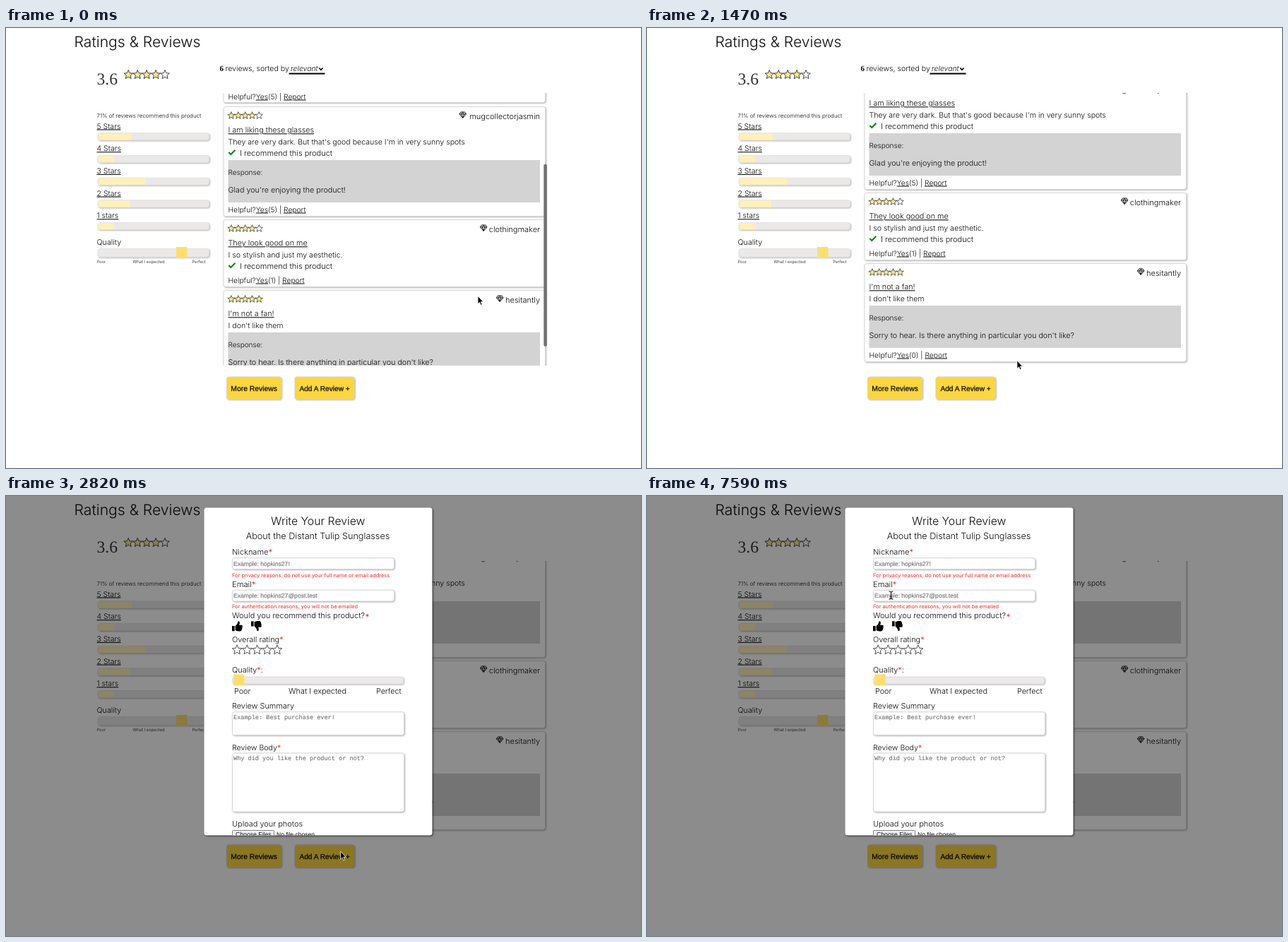
An HTML page that plays this animation: 899x623 px, repeating every 8 s.

```html
<!DOCTYPE html>
<html lang="en">
<head>
<meta charset="utf-8">
<title>Ratings &amp; Reviews</title>
<style>
html, body { margin: 0; width: 100%; height: 100%; overflow: hidden; background: #fff; }
svg { display: block; width: 899px; height: 623px; }
text { font: 300 10.8px Inter, sans-serif; fill: #0c0c0c; text-rendering: geometricPrecision; white-space: pre; }
.u { text-decoration: underline; text-decoration-thickness: .9px; text-underline-offset: 1.2px; }
.req { fill: #f00; }
.note { fill: #f52a2a; font-weight: 400; }
.sans { font-family: "Liberation Sans", Arial, sans-serif; font-weight: 400; }
.btn { stroke: #0c0c0c; stroke-width: .25px; }
.hint { fill: #757575; stroke: #757575; stroke-width: .15px; }
.mono { font-family: "Liberation Mono", monospace; font-weight: 400; }
.serif { font-family: "Liberation Serif", serif; font-weight: 400; }
.lift { filter: drop-shadow(1.5px 1.5px .8px rgba(0, 0, 0, .3)); }
.end { text-anchor: end; }
.mid { text-anchor: middle; }
</style>
</head>
<body>
<svg id="stage" viewBox="0 0 899 623" xmlns="http://www.w3.org/2000/svg"></svg>
<script>
const stage = document.getElementById('stage');

const text = (x, y, s, size = 10.8, cls = '', css = '') =>
  `<text x="${x}" y="${y}" class="${cls}" style="font-size:${size}px;${css}">${s}</text>`;
const rect = (x, y, w, h, fill, extra = '') =>
  `<rect x="${x}" y="${y}" width="${w}" height="${h}" fill="${fill}" ${extra}/>`;
const box = (x, y, w, h, fill = '#fff', line = '#d0d0d0', r = 3) =>
  rect(x + .5, y + .5, w - 1, h - 1, fill, `rx="${r}" stroke="${line}" stroke-width=".8" class="lift"`);
const link = s => `<tspan class="u">${s}</tspan>`;
const star = '<tspan class="req">*</tspan>';

function starPath(cx, cy, r) {
  const pts = [];
  for (let i = 0; i < 10; i++) {
    const a = Math.PI * (i / 5 - .5), k = i % 2 ? r * .45 : r;
    pts.push((cx + k * Math.cos(a)).toFixed(2) + ',' + (cy + k * Math.sin(a)).toFixed(2));
  }
  return pts.join(' ');
}

function stars(x, cy, pitch, r, full, line = .7) {
  let s = '';
  for (let i = 0; i < 5; i++)
    s += `<polygon points="${starPath(x + pitch * (i + .5), cy, r)}" fill="${i < full ? '#fbe78f' : '#fff'}"
      stroke="#222" stroke-width="${line}" stroke-linejoin="round"/>`;
  return s;
}

const gem = (x, y) => `<path transform="translate(${x} ${y})" d="M2.4 .5H7.9L9.9 3.4 5.1 9 .4 3.4ZM.4 3.4H9.9M3.3 3.4 5.1 .6 7 3.4 5.1 8.8Z"
  fill="none" stroke="#111" stroke-width="1" stroke-linejoin="round"/>`;
const tick = y => `<path d="M315.3 ${y}l3 3 6.2-6.3" fill="none" stroke="#0a860a" stroke-width="2.1"/>`;

const helpful = (y, n) => text(314.5, y, `Helpful?${link('Yes')}(${n}) | ${link('Report')}`, 10.25);

// One review card; rows are stacked below its top edge.
function card(top, o) {
  let y = top + 54, s = '';
  if (o.recommend) {
    s += tick(y + 11) + text(331, y + 16, 'I recommend this product', 11);
    y += 16;
  }
  if (o.reply) {
    s += rect(314.5, y + 6, 441.5, 60, '#d3d3d3') + text(314.5, y + 26.5, 'Response:', 10) +
      text(314.5, y + 51.5, o.reply, 10.75);
    y += 60;
  }
  return box(307.5, top, 456.5, y + 26 - top) + s +
    stars(314, top + 13, 9.85, 5.3, o.full) +
    text(756, top + 18, o.name, 11, 'end') + gem(o.gem, top + 7.5) +
    text(314.5, top + 37.3, o.title, 10.75, 'u') + text(314.5, top + 53.6, o.body, 10.6) +
    helpful(y + 19.5, o.votes);
}

const cards =
  box(307.5, 20, 456.5, 86) + helpful(100.5, 5) +
  card(111, { name: 'mugcollectorjasmin', gem: 641.5, full: 4, title: 'I am liking these glasses',
    body: "They are very dark. But that's good because I'm in very sunny spots",
    recommend: true, reply: "Glad you're enjoying the product!", votes: 5 }) +
  card(271, { name: 'clothingmaker', gem: 671, full: 4, title: 'They look good on me',
    body: 'I so stylish and just my aesthetic.', recommend: true, votes: 1 }) +
  card(371, { name: 'hesitantly', gem: 694, full: 5, title: "I'm not a fan!", body: "I don't like them",
    reply: "Sorry to hear. Is there anything in particular you don't like?", votes: 0 });

function summary() {
  let s = text(96.5, 27, 'Ratings &amp; Reviews', 21.15) + text(128.5, 80, '3.6', 23.6, 'serif', 'fill:#333') +
    stars(166.8, 66.2, 12.95, 6.7, 4, .85) +
    text(128.5, 127.3, '71% of reviews recommend this product', 7.95);
  ['5 Stars', '4 Stars', '3 Stars', '2 Stars', '1 stars'].forEach((label, i) => {
    const y = 148.5 + 31.7 * i, w = [47, 22, 67, 45, 22][i];
    s += text(128.5, y - 6, label, 10.5, 'u') + box(129.5, y, 158.5, 10.8, '#ebe8e8', '#e2dfdf') +
      rect(131, y + .8, w, 9.2, '#fdf0b9');
  });
  return s + text(128.5, 307.3, 'Quality', 10.7) + box(129.5, 312.3, 158.5, 12.5, '#ebe8e8', '#e2dfdf') +
    rect(241, 310, 15.5, 15.5, '#fede6f') + text(128.5, 333.3, 'Poor', 5.8) +
    text(179.5, 333.3, 'What I expected', 6) + text(263.5, 333.3, 'Perfect', 5.8);
}

const heading =
  text(302.5, 60.5, '6', 11, 'serif', 'font-weight:700') + text(310.5, 60.5, 'reviews, sorted by', 10.6) +
  text(403, 60.5, 'relevant', 10.4, '', 'font-style:italic') +
  '<path d="M443.3 56.5l2.6 2.8 2.6-2.8" fill="none" stroke="#000" stroke-width="1.6"/>' +
  rect(400.5, 63.6, 51, 2, '#000');

const button = (x, w, label, size) =>
  box(x, 493.5, w, 32.6, '#fcd640', '#d8d3c0') + text(x + w / 2, 513.8, label, size, 'sans btn mid');
const buttons = button(312, 78.2, 'More Reviews', 10.35) + button(408.5, 85.2, 'Add A Review +', 10.15);

const thumb = (x, y, flip) => `<path transform="translate(${x} ${y}) scale(1 ${flip})"
  d="M0-.3H3.6V7H0ZM4.6-.2C6.5-1.8 8-3.4 8.2-6 8.4-7.6 10.8-7.3 10.9-4.8 10.9-3.4 10.3-2.4 10.1-1.5H13.4C15-1.5 15.2 .3 14.3 1.1 15 2 14.8 3.2 14 3.7 14.3 4.7 13.9 5.5 13.2 5.9 13.3 6.9 12.5 7.3 11.3 7.3H9C7 7.3 6 6.3 4.6 6.1Z" fill="#000"/>`;

const form =
  rect(280.5, 16.5, 323, 464, '#fff', 'rx="3.5" style="filter:drop-shadow(1.5px 1.5px 1.2px rgba(0,0,0,.7))"') +
  '<g clip-path="url(#sheet)">' +
  text(441.8, 41.2, 'Write Your Review', 15.8, 'mid') +
  text(441.5, 61, 'About the Distant Tulip Sunglasses', 12.65, 'mid') +
  text(320, 83.2, 'Nickname' + star, 11) + box(320, 87.3, 230, 16.7) +
  text(322, 98.6, 'Example: hopkins27!', 8.6, 'sans hint') +
  text(320, 114.6, 'For privacy reasons, do not use your full name or email address', 7.45, 'note') +
  text(320, 128.5, 'Email' + star, 11.2) + box(320, 132.8, 230, 16.7) +
  text(322, 144, 'Example: hopkins27@post.test', 8.6, 'sans hint') +
  text(320, 159.4, 'For authentication reasons, you will not be emailed', 7.45, 'note') +
  text(320, 173.4, 'Would you recommend this product?' + star, 11) +
  thumb(320, 184.2, 1) + thumb(347, 184.2, -1) +
  text(320, 207, 'Overall rating' + star, 10.9) + stars(320, 218, 14.2, 7.2, 0, .8) +
  text(320, 249.6, 'Quality' + star + ':', 10.9) + box(320, 255.7, 243, 10.8, '#ebe9e9', '#dedcdc') +
  rect(322, 252.6, 15.6, 15.6, '#fede6f') +
  text(323, 279.7, 'Poor', 10.8) + text(400, 279.7, 'What I expected', 10.9) + text(524, 279.7, 'Perfect', 10.7) +
  text(320, 301.2, 'Review Summary', 10.9) + box(320, 305.3, 244, 33.7) +
  text(322, 315.6, 'Example: Best purchase ever!', 8.57, 'mono hint') +
  text(320, 359.8, 'Review Body' + star, 10.6) + box(320, 363.6, 244, 84) +
  text(322, 374, 'Why did you like the product or not?', 8.57, 'mono hint') +
  text(320, 468.2, 'Upload your photos', 10.95) +
  rect(320.5, 473.5, 59, 13, '#efefef', 'rx="1" stroke="#777" stroke-width=".9"') +
  text(325, 482.2, 'Choose Files', 8.7, 'sans') + text(383, 482.2, 'No file chosen', 8.5, 'sans') +
  '</g>';

stage.innerHTML = `
  <defs>
    <clipPath id="list"><rect x="306" y="92" width="461" height="386"/></clipPath>
    <clipPath id="sheet"><rect x="280.5" y="16.5" width="323" height="464"/></clipPath>
  </defs>
  ${rect(0, 0, 899, 623, '#fff')}${summary()}${heading}
  <g clip-path="url(#list)"><g id="cards">${cards}</g></g>
  ${rect(761.3, 192.8, 4.6, 258, '#717171', 'rx="2" id="bar"')}
  ${buttons}
  <g id="modal">${rect(0, 0, 899, 623, '#000', 'fill-opacity=".45"')}${form}</g>
  <path id="arrow" d="M0 0V11.2L2.5 8.9 4.2 12.8 6.1 12 4.4 8.2H7.8Z" fill="#000" stroke="#fff" stroke-width=".8"/>
  <g id="beam" fill="none">
    <path d="M-3-5.5Q0-5.5 0-3.5Q0-5.5 3-5.5M0-4V4M-3 5.5Q0 5.5 0 3.5Q0 5.5 3 5.5M-1.5 1.5H1.5" stroke="#111" stroke-width="1.1"/>
  </g>`;

const [cardsEl, bar, modal, arrow, beam] =
  ['cards', 'bar', 'modal', 'arrow', 'beam'].map(id => document.getElementById(id));

const LOOP = 8000, TICK = 148.8;
const clamp = v => Math.max(0, Math.min(1, v));

// Pointer stops: tick, x, y
const route = [
  [6, 668, 379.5], [12, 473.5, 503], [20, 473.5, 503], [28, 381.5, 127],
  [29, 364.5, 115.5], [31, 361.5, 109.7], [32, 361.5, 109.7], [33, 361.5, 99], [35, 361.5, 99],
  [36, 361.5, 98.3], [38, 361.5, 98.3], [41, 357, 88], [44, 335.5, 113], [46, 345.5, 131], [51, 345.5, 140.5]
];

function pointer(n) {
  if (n <= route[0][0]) return route[0].slice(1);
  for (let i = 1; i < route.length; i++) {
    const [a, ax, ay] = route[i - 1], [b, bx, by] = route[i];
    if (n <= b) {
      const k = (n - a) / (b - a), e = k * k * (3 - 2 * k);
      return [ax + (bx - ax) * e, ay + (by - ay) * e];
    }
  }
  return route[route.length - 1].slice(1);
}

function draw(ms) {
  const n = Math.floor((ms % LOOP + 18) / TICK);   // the picture moves in even ticks
  const scroll = 1 - (1 - clamp(n / 4)) ** 2;
  cardsEl.setAttribute('transform', `translate(0 ${-38 * scroll})`);
  bar.setAttribute('transform', `translate(0 ${25.5 * scroll})`);
  bar.setAttribute('opacity', clamp((9 - n) / 3));
  modal.setAttribute('opacity', n < 18 ? 0 : n === 18 ? .31 : 1);
  const at = `translate(${pointer(n).join(' ')})`;
  arrow.setAttribute('transform', at);
  beam.setAttribute('transform', at);
  arrow.setAttribute('visibility', n < 29 ? 'visible' : 'hidden');
  beam.setAttribute('visibility', n < 29 ? 'hidden' : 'visible');
}

const start = performance.now();
function frame() {
  draw(performance.now() - start);
  requestAnimationFrame(frame);
}
draw(0);
requestAnimationFrame(frame);
</script>
</body>
</html>
```
